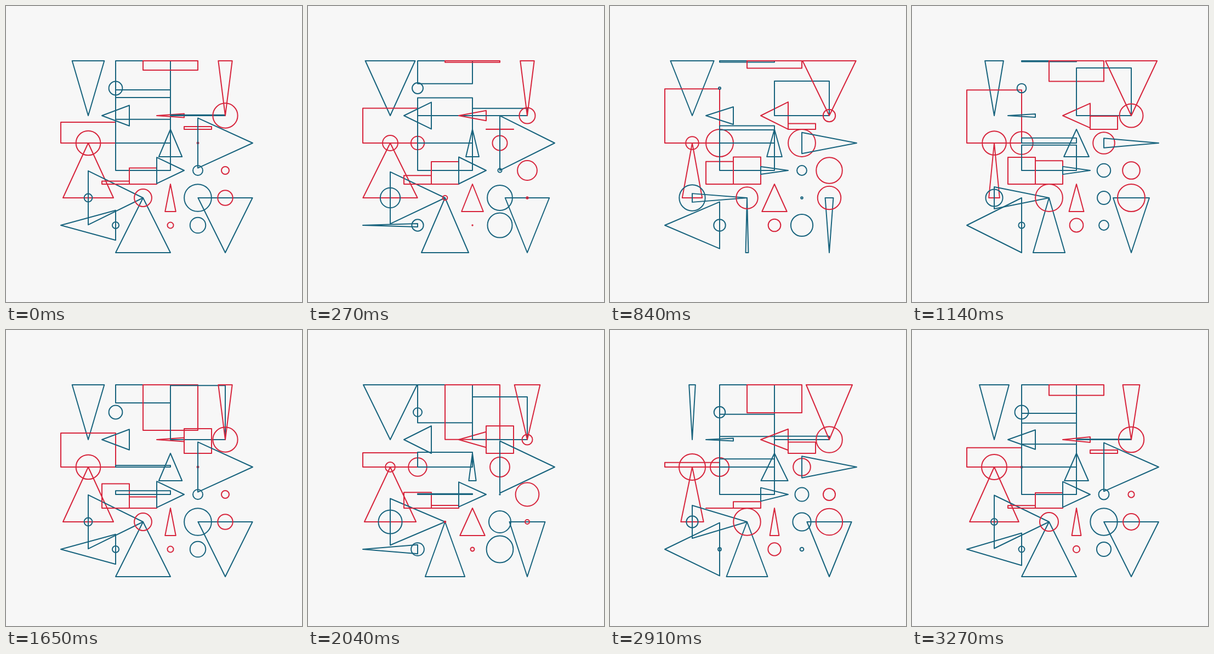
Animation of 540 by 540 pixels, one loop 3300 ms. Source, as an HTML page with a canvas:

```html
<!DOCTYPE html>
<html lang="en">
<head>
<meta charset="utf-8">
<title>Breathing shapes</title>
<style>
  html, body { margin: 0; width: 100%; height: 100%; overflow: hidden; background: #f7f7f7; }
  canvas { display: block; }
</style>
</head>
<body>
<canvas width="540" height="540"></canvas>
<script>
const ctx = document.querySelector('canvas').getContext('2d');
const LOOP = 3300, STEP = 30;
const red = '#d7263d', blue = '#19647e';

// kind, colour, left, top, cell size, phase in degrees (listed back to front)
const shapes = [
  ['down', blue, 100, 100, 100, -54.1],
  ['rise', red, 100, 150, 100, -103.9],
  ['up', red, 100, 250, 100, -23],
  ['left', blue, 100, 350, 100, 57],
  ['circle', red, 125, 225, 50, 26.5],
  ['circle', blue, 125, 325, 50, -72.8],
  ['right', blue, 150, 300, 100, -10.7],
  ['left', blue, 175, 175, 50, -41.5],
  ['circle', red, 175, 225, 50, -90.4],
  ['rise', red, 175, 275, 50, -141.3],
  ['circle', blue, 187.5, 137.5, 25, 7.7],
  ['circle', blue, 187.5, 387.5, 25, -61],
  ['fall', blue, 200, 100, 100, 70],
  ['rise', blue, 200, 150, 100, 20],
  ['rise', blue, 200, 200, 100, -30.2],
  ['up', blue, 200, 350, 100, 1.2],
  ['rise', red, 225, 275, 50, -79.6],
  ['circle', red, 225, 325, 50, 50.5],
  ['fall', red, 250, 100, 100, 131.3],
  ['left', red, 275, 175, 50, 82],
  ['up', blue, 275, 225, 50, 32],
  ['right', blue, 275, 275, 50, -17.8],
  ['up', red, 275, 325, 50, -67],
  ['circle', red, 287.5, 387.5, 25, 63.7],
  ['rise', blue, 300, 100, 100, -166.6],
  ['rise', red, 325, 175, 50, 143.1],
  ['circle', red, 325, 225, 50, -86.7],
  ['circle', blue, 325, 325, 50, -5.8],
  ['circle', blue, 325, 375, 50, -55.2],
  ['circle', blue, 337.5, 287.5, 25, 44],
  ['down', red, 350, 100, 100, 75.3],
  ['right', blue, 350, 200, 100, -24.3],
  ['down', blue, 350, 350, 100, 6.9],
  ['circle', red, 375, 175, 50, 25],
  ['circle', red, 375, 275, 50, -73.7],
  ['circle', red, 375, 325, 50, 56.7]
];
const turns = ['up', 'right', 'down', 'left'];

function drawShape([kind, colour, x, y, size, phase], angle) {
  const half = size / 2;
  const wave = Math.cos(angle + phase * Math.PI / 180);
  const reach = half * Math.abs(wave);
  const height = half * (1 + wave);

  ctx.save();
  ctx.translate(x + half, y + half);
  ctx.strokeStyle = colour;
  ctx.beginPath();
  if (kind === 'circle') {
    ctx.arc(0, 0, reach, 0, 2 * Math.PI);
  } else if (kind === 'fall') {
    ctx.rect(-half, -half, size, height);
  } else if (kind === 'rise') {
    ctx.rect(-half, half - height, size, height);
  } else {
    ctx.rotate(turns.indexOf(kind) * Math.PI / 2);
    ctx.moveTo(0, -half);
    ctx.lineTo(reach, half);
    ctx.lineTo(-reach, half);
    ctx.closePath();
  }
  ctx.stroke();
  ctx.restore();
}

function draw(now) {
  const time = Math.floor((now + 0.5) / STEP) * STEP % LOOP;
  const angle = 2 * Math.PI * time / LOOP;
  ctx.fillStyle = '#f7f7f7';
  ctx.fillRect(0, 0, 540, 540);
  ctx.lineWidth = 2;
  ctx.lineJoin = 'round';
  for (const shape of shapes) drawShape(shape, angle);
  requestAnimationFrame(draw);
}
draw(0);
</script>
</body>
</html>
```
